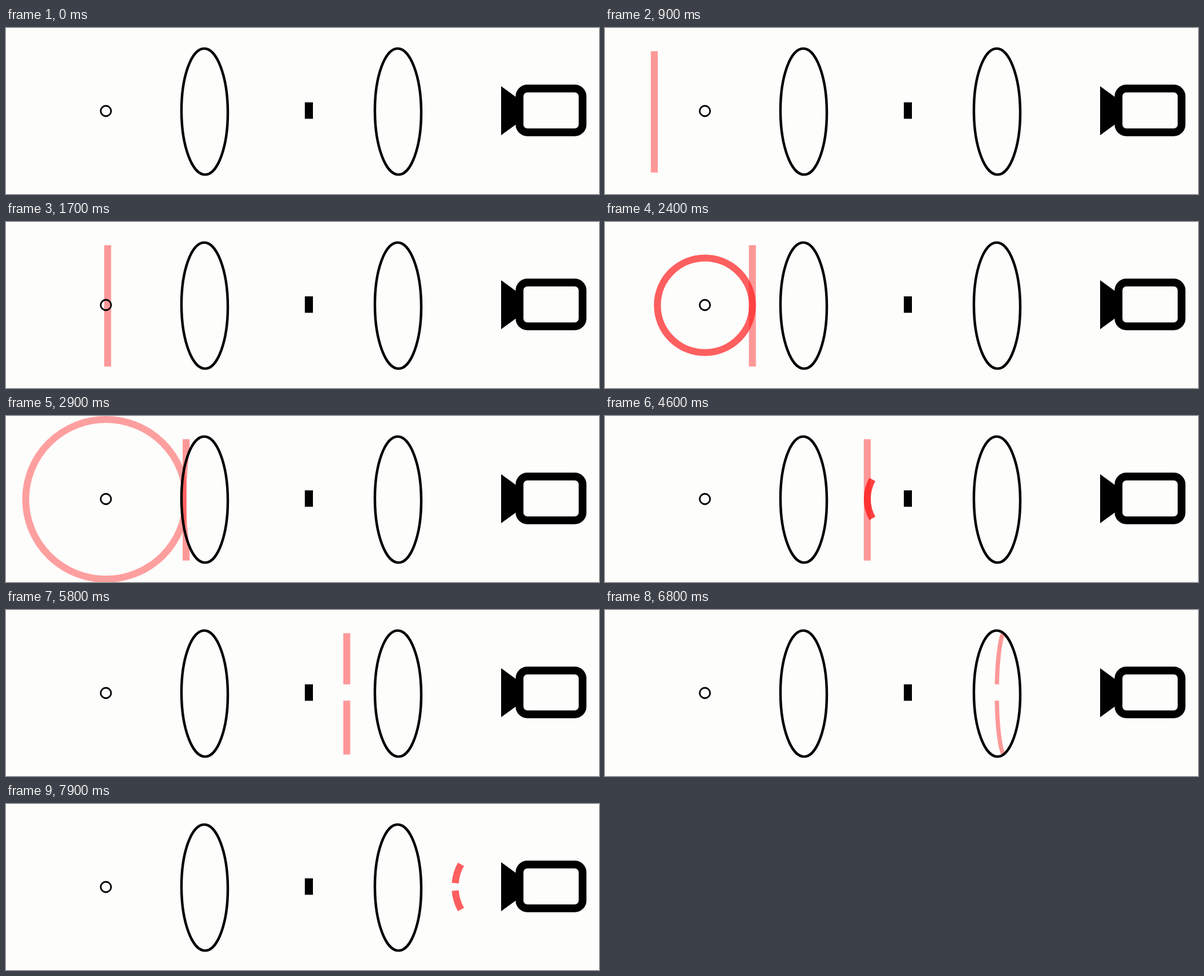
These frames come from a looping animation (1024x288 px, 8000 ms). An HTML page:

```html
<!DOCTYPE html>
<html lang="en">
<head>
<meta charset="utf-8">
<title>Light waves through two lenses</title>
<style>
  html, body { margin: 0; width: 100%; height: 100%; overflow: hidden; background: #fdfdfc; }
  svg { display: block; width: 1024px; height: 288px; }
  .outline { fill: none; stroke: #000; }
  .waves { fill: none; stroke: #ff1e1e; }
</style>
</head>
<body>
<svg viewBox="0 0 1024 288">
  <defs>
    <!-- left: everything not shadowed by the first lens -->
    <clipPath id="left"><path d="M-10 -20 H423 L333.6 38.6 A40 109.4 0 0 0 333.6 251.4 L423 310 H-10 Z"/></clipPath>
    <clipPath id="lens1"><ellipse cx="343" cy="145" rx="40" ry="109.4"/></clipPath>
    <clipPath id="between"><path d="M343 35.6 A40 109.4 0 0 1 343 254.4 H677 A40 109.4 0 0 1 677 35.6 Z"/></clipPath>
    <clipPath id="lens2"><ellipse cx="677" cy="145" rx="40" ry="109.4"/></clipPath>
    <clipPath id="right"><path d="M677 35.6 A40 109.4 0 0 1 677 254.4 H1024 V35.6 Z"/></clipPath>
  </defs>
  <g class="waves">
    <path id="ring" clip-path="url(#left)"/>
    <path id="plane" clip-path="url(#left)"/>
    <path id="planeInLens" clip-path="url(#lens1)"/>
    <path id="ringInLens" clip-path="url(#lens1)"/>
    <path id="flattened" clip-path="url(#between)"/>
    <path id="focused" clip-path="url(#between)"/>
    <path id="imageInLens" clip-path="url(#lens2)"/>
    <path id="image" clip-path="url(#right)"/>
  </g>
  <circle class="outline" cx="172.5" cy="144" r="9" stroke-width="2.8"/>
  <g class="outline" stroke-width="4.4">
    <ellipse cx="343" cy="145" rx="40" ry="109.4" transform="rotate(-.4 343 145)"/>
    <ellipse cx="677" cy="145" rx="40" ry="109.4" transform="rotate(-.4 677 145)"/>
  </g>
  <rect x="516" y="129" width="14" height="28.5"/>
  <path d="M855 101 L881 120 V167 L855 186 Z"/>
  <rect class="outline" x="886.8" y="105" width="108.8" height="76" rx="13.5" stroke-width="13.4"/>
</svg>
<script>
const LOOP = 8000, STEP = 100, SPEED = .11293, WIDTH = 12, ALPHA = .45;
const SOURCE = 172.5, LENS1 = 343, STOP = 523, LENS2 = 677, CAMERA = 857;
const TOP = 40.3, BOTTOM = 250.7, GAP_TOP = 129, GAP_BOTTOM = 157.3;
const RX = 40, RY = 109.4, MID = 145;
const SLOW = .615;                       // speed inside glass
const DELAY = 2 * RX * (1 / SLOW - 1);   // distance lost in one lens
const CONE = 28.8 * Math.PI / 180, SHADOW = 4.6 * Math.PI / 180;

const whole = [[TOP, BOTTOM]];
const split = [[TOP, GAP_TOP], [GAP_BOTTOM, BOTTOM]];

function show(id, d, alpha = ALPHA, width = WIDTH) {
  const el = document.getElementById(id);
  el.setAttribute('d', d);
  el.setAttribute('stroke-opacity', alpha);
  el.setAttribute('stroke-width', width);
}

const glow = r => Math.min(1, 58 / Math.max(r, 1));
const bar = (x, spans) => spans.map(([a, b]) => `M${x} ${a} V${b}`).join('');

// A flat wave inside a lens takes the lens shape, squeezed; side -1 enters, 1 leaves.
function bent(lens, x, side, spans) {
  const rx = RX * (1 - SLOW), c = lens * (1 - SLOW) + x * SLOW;
  const at = y => `${c + side * rx * Math.sqrt(1 - ((y - MID) / RY) ** 2)} ${y}`;
  return spans.map(([a, b]) => `M${at(a)} A${rx} ${RY} 0 0 ${side > 0 ? 1 : 0} ${at(b)}`).join('');
}

// Wave closing in on a focus, with an optional dark core.
function closing(id, focus, x, core = 0) {
  const r = focus - x, cy = 143.8;
  if (r < 1) return show(id, '');
  const at = k => `${focus - r * Math.cos(k)} ${cy + r * Math.sin(k)}`;
  const arc = (a, b) => `M${at(a)} A${r} ${r} 0 0 0 ${at(b)}`;
  show(id, arc(-CONE, -core) + arc(core, CONE), glow(r));
}

function circle(r) {
  return `M${SOURCE - r} 144.5 a${r} ${r} 0 0 1 ${2 * r} 0 a${r} ${r} 0 0 1 ${-2 * r} 0 Z`;
}

function draw(t) {
  const x = 311 + (t - 2900) * SPEED, x1 = x - DELAY, x2 = x1 - DELAY;
  const glass = WIDTH * SLOW;

  show('ring', t > 1700 ? circle(x - SOURCE) : '', glow(x - SOURCE));
  show('plane', bar(x, whole));
  show('planeInLens', bent(LENS1, x, -1, whole), ALPHA, glass);
  show('ringInLens', bent(LENS1, x1, 1, whole), ALPHA, glass);
  show('flattened', bar(x1, x1 > STOP ? split : whole));
  closing('focused', STOP, x1);
  show('imageInLens', bent(LENS2, x1, -1, split), ALPHA, glass);
  closing('image', CAMERA, x2, SHADOW);
}

const start = performance.now();
function tick() {
  const t = (performance.now() - start) % LOOP;
  draw(Math.floor(t / STEP) * STEP);
  requestAnimationFrame(tick);
}
tick();
</script>
</body>
</html>
```
